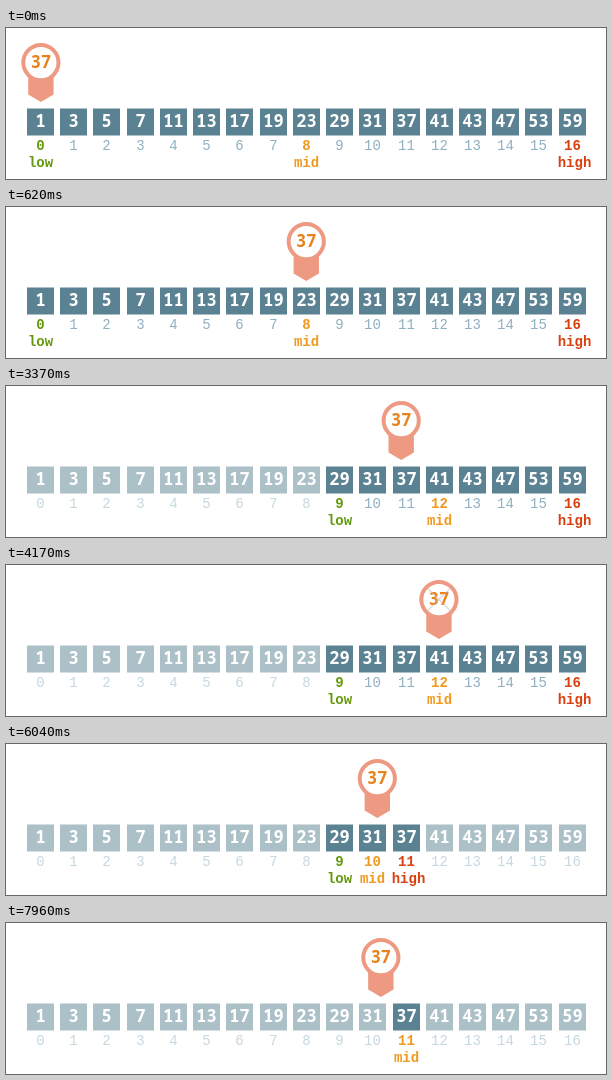
An HTML page for the animation above (8 s loop, 600 px wide and 151 px high).

```html
<!DOCTYPE html>
<html lang="en">
<head>
<meta charset="utf-8">
<title>Binary search</title>
<style>
  html, body { margin: 0; width: 100%; height: 100%; overflow: hidden; background: #fff; }
  svg { display: block; width: 100%; height: 100%; }
  .value { font: 600 17px "Noto Sans Mono", monospace; text-anchor: middle; fill: #fff; }
  .label { font: 14px "Liberation Mono", monospace; text-anchor: middle; }
  .plain { fill: #8fb0c0; }
  .low, .mid, .high { font-weight: 700; }
  .low { fill: #64990f; }
  .mid { fill: #f0991f; }
  .high { fill: #d8410f; }
  .box { fill: #5a8292; }
  .pin { fill: #ee9a82; }
  .ring { fill: #fff; stroke: #ee9a82; stroke-width: 4; }
  .target { fill: #e8821c; }
  .cross { stroke: #c4b3aa; stroke-width: 1.4; }
</style>
</head>
<body>
<svg viewBox="0 0 600 151">
  <g id="cells"></g>
  <g id="pointer">
    <path class="pin" d="M-12.7 14H12.7V32L0 39.3L-12.7 32Z"/>
    <circle class="ring" r="17.6"/>
    <text class="value target" y="5.4">37</text>
    <path id="cross" class="cross" d="M-12.5 -12.5L12.5 12.5M12.5 -12.5L-12.5 12.5"/>
  </g>
</svg>
<script>
const LOOP = 8000;
const MOVE = { duration: 620, frames: 15 };
const FADE = { duration: 410, frames: 10 };
const primes = [1, 3, 5, 7, 11, 13, 17, 19, 23, 29, 31, 37, 41, 43, 47, 53, 59];
const roles = ['low', 'mid', 'high'];

// Search ranges in turn; "first" is when a change becomes visible.
const ranges = [
  { low: 0, mid: 8, high: 16 },
  { low: 9, mid: 12, high: 16 },
  { low: 9, mid: 10, high: 11 },
  { low: 11, mid: 11, high: 11 }
];
const moves = [
  { start: 0, first: 35, to: 8 },
  { start: 3085, first: 3120, to: 12 },
  { start: 5590, first: 5670, to: 10 },
  { start: 7880, first: 7920, to: 11 }
];
const fades = [
  { start: 1210, first: 1250 },
  { start: 4170, first: 4170 },
  { start: 6670, first: 6670 }
];

const cellLeft = i => Math.round(21 + i * 33.23);
const cellCentre = i => cellLeft(i) + 13.5;
const pointerX = i => 34.9 + i * 33.17;
const mix = (a, b, p) => a + (b - a) * p;
const easeOut = p => 1 - (1 - p) ** 2;

function add(parent, tag, attributes, text = '') {
  const node = document.createElementNS('http://www.w3.org/2000/svg', tag);
  for (const name in attributes) node.setAttribute(name, attributes[name]);
  node.textContent = text;
  return parent.appendChild(node);
}

const cellsNode = document.getElementById('cells');
const pointer = document.getElementById('pointer');
const cross = document.getElementById('cross');

const cells = primes.map((prime, i) => {
  const x = cellCentre(i);
  const box = add(cellsNode, 'rect', { class: 'box', x: cellLeft(i), y: 80.5, width: 27, height: 27 });
  add(cellsNode, 'text', { class: 'value', x, y: 99.3 }, prime);
  const labels = {};
  for (const role of ['plain', ...roles]) {
    const group = labels[role] = add(cellsNode, 'g', { class: 'label ' + role });
    add(group, 'text', { x, y: 122 }, i);
    const shift = role === 'high' ? 2 : 0;
    if (role !== 'plain') add(group, 'text', { x: x + shift, y: 139 }, role);
  }
  return { box, labels };
});

function look(range, i) {
  const role = ['mid', 'low', 'high'].find(name => range[name] === i) || 'plain';
  const strength = i >= range.low && i <= range.high ? 1 : 0.5;
  return { strength, label: name => name === role ? strength : 0 };
}

// Progress advances in discrete frames.
function progress(t, { start, first }, { duration, frames }) {
  if (t < first) return 0;
  const frame = Math.floor((t - start + 5) / duration * frames);
  return Math.min(1, Math.max(0, frame / frames));
}

function render(t) {
  let position = 0;
  for (const move of moves) {
    position = mix(position, move.to, easeOut(progress(t, move, MOVE)));
  }
  pointer.setAttribute('transform', `translate(${pointerX(position)} 34.6)`);

  const done = fades.filter(fade => t >= fade.first).length;
  const p = done ? progress(t, fades[done - 1], FADE) : 1;
  const before = ranges[Math.max(0, done - 1)];
  const after = ranges[done];
  cross.style.opacity = p < 1 ? Math.sin(Math.PI * (p * 10 + 2) / 12) : 0;

  cells.forEach(({ box, labels }, i) => {
    const a = look(before, i), b = look(after, i);
    box.style.opacity = mix(a.strength, b.strength, p);
    for (const role in labels) {
      labels[role].style.opacity = mix(a.label(role), b.label(role), p);
    }
  });
}

const origin = performance.now();
function tick() {
  render((performance.now() - origin) % LOOP);
  requestAnimationFrame(tick);
}
tick();
</script>
</body>
</html>
```
